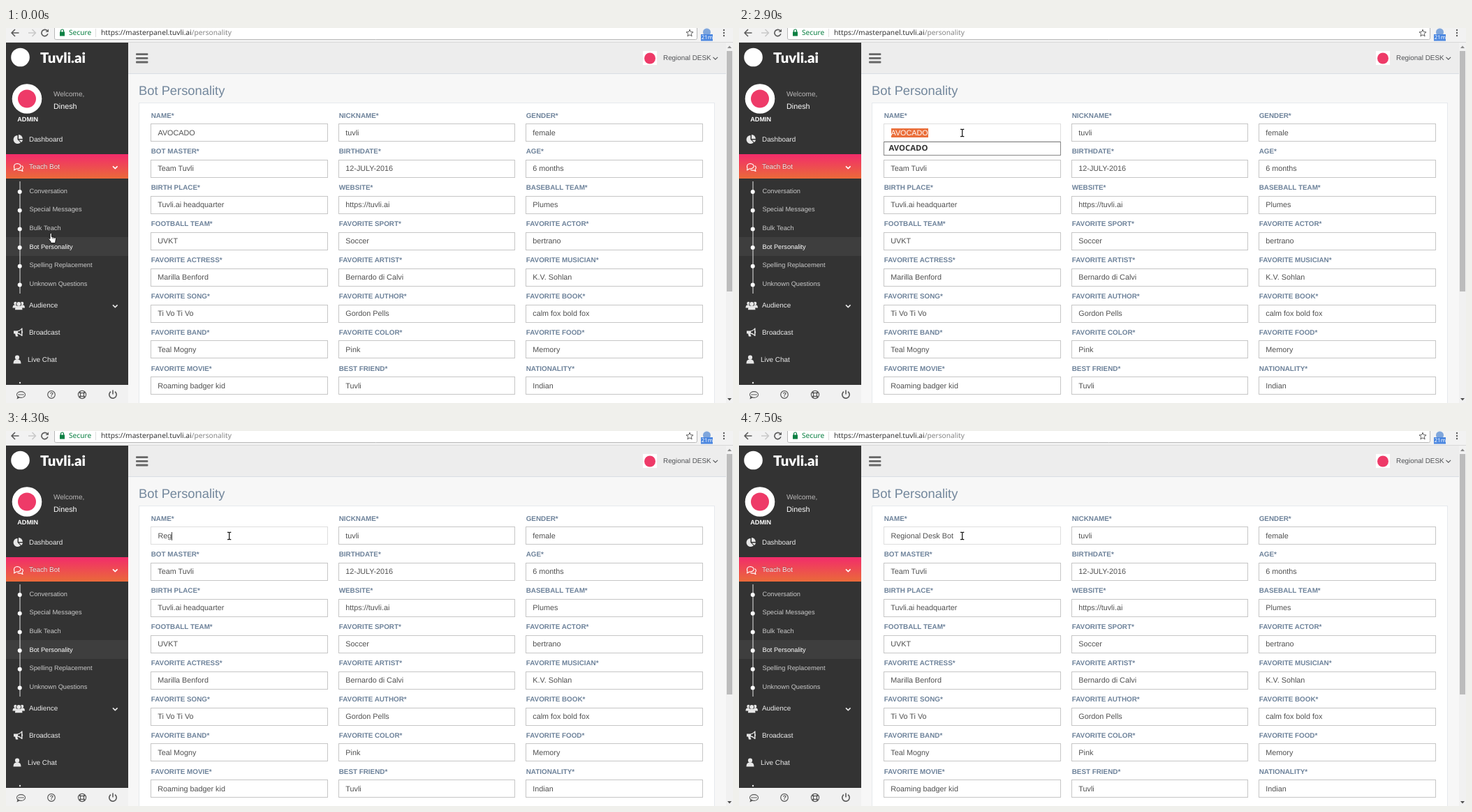
An HTML page with a canvas for the animation above (8 s loop, 1041 px wide and 538 px high).

```html
<!DOCTYPE html>
<html lang="en">
<head>
<meta charset="utf-8">
<title>Bot Personality</title>
<style>
html, body { margin: 0; width: 100%; height: 100%; overflow: hidden; background: #f7f7f7; }
#stage { position: absolute; left: 0; top: 0; width: 1041px; height: 538px; overflow: hidden;
  font-family: "Liberation Sans", Arial, sans-serif; text-rendering: geometricPrecision; }
canvas { position: absolute; left: 0; top: 0; }
span { position: absolute; line-height: 0; white-space: pre; }
.ui { font-family: "Noto Sans", "Open Sans", sans-serif; }
.logo { font-family: Lato, sans-serif; }
.active { text-shadow: 0 -1px 0 rgba(0, 0, 0, .25); }
#pick, #caret { position: absolute; left: 217.5px; top: 144px; height: 13px; }
#pick { background: #ea6f3b; }
#caret { width: 1px; top: 145px; height: 12px; background: #444; }
#popup { position: absolute; left: 207px; top: 163px; width: 252px; height: 18px;
  background: #fff; border: 1px solid #888; }
</style>
</head>
<body>
<div id="stage">
  <canvas id="base" width="1041" height="538"></canvas>
  <div id="pick"></div>
  <div id="labels"></div>
  <div id="caret"></div>
  <div id="popup"></div>
  <canvas id="mouse" width="1041" height="538"></canvas>
</div>
<script>
const $ = id => document.getElementById(id);
const g = $("base").getContext("2d");
const m = $("mouse").getContext("2d");
const OLD_NAME = "AVOCADO", NEW_NAME = "Regional Desk Bot";
const KEY_TIMES = [3900, 4100, 4300, 4600, 4800, 5000, 5100, 5200, 5300,
  5600, 5800, 5900, 6000, 6200, 6600, 6800, 6900];
const LOOP = 8000, LEFT = 217.5;

// y is the middle of the capitals
function label(text, x, y, size, color, opts = {}) {
  const s = document.createElement("span");
  s.textContent = text;
  s.className = opts.cls || "";
  s.style.cssText = `left:${x}px;top:${y}px;font-size:${size}px;color:${color};font-weight:${opts.weight || 400}`;
  (opts.parent || $("labels")).append(s);
  return s;
}
function rect(x, y, w, h, fill) {
  g.fillStyle = fill;
  g.fillRect(x, y, w, h);
}
function box(x, y, w, h, fill, line) {
  rect(x, y, w, h, line);
  rect(x + 1, y + 1, w - 2, h - 2, fill);
}
function disc(x, y, r, fill) {
  g.fillStyle = fill;
  g.beginPath();
  g.arc(x, y, r, 0, 7);
  g.fill();
}
function ring(x, y, r, color, width, from = 0, to = 2 * Math.PI) {
  g.strokeStyle = color;
  g.lineWidth = width;
  g.beginPath();
  g.arc(x, y, r, from, to);
  g.stroke();
}
function shape(d, fill) {
  g.fillStyle = fill;
  g.fill(new Path2D(d));
}
function line(d, color, width, c = g) {
  c.strokeStyle = color;
  c.lineWidth = width;
  c.lineJoin = "round";
  c.stroke(new Path2D(d));
}

function drawBrowser() {
  rect(0, 0, 1041, 21, "#f2f2f2");
  g.fillStyle = "#fff";
  g.strokeStyle = "#b8b8b8";
  g.lineWidth = 1;
  g.beginPath();
  g.roundRect(69.5, -6, 920, 22.5, 2);
  g.fill();
  g.stroke();
  rect(0, 20, 1041, 1, "#d8d8d8");
  line("M18.5 7H8M13 2L8 7L13 12", "#5c5c5c", 1.6);
  line("M32 7H42.5M37.5 2L42.5 7L37.5 12", "#c9c9c9", 1.6);
  ring(55.5, 7, 4.6, "#5c5c5c", 1.6, 0.3, 5.5);
  shape("M56.5 5.8H61V1.5Z", "#5c5c5c");
  rect(77, 5.5, 7, 6, "#0b8043");
  line("M78.5 6V4a2 2 0 0 1 4 0V6", "#0b8043", 1.2);
  label("Secure", 90, 6.3, 10.2, "#0b8043", { cls: "ui" });
  const url = label("https://masterpanel.tuvli.ai", 136, 6.3, 10.2, "#333", { cls: "ui" });
  label("/personality", 136 + url.getBoundingClientRect().width, 6.3, 10.2, "#858585", { cls: "ui" });
  rect(128, 1, 1, 12, "#ddd");
  let star = "";
  for (let i = 0; i < 10; i++) {
    const r = i % 2 ? 2.3 : 5.3, a = i * Math.PI / 5 - Math.PI / 2;
    star += (i ? "L" : "M") + (979 + r * Math.cos(a)) + " " + (7.5 + r * Math.sin(a));
  }
  line(star + "Z", "#5c5c5c", 1);
  disc(1003.5, 6, 5.5, "#7fa6dc");
  rect(995, 9, 17, 9.5, "#4a86e0");
  label("21m", 995.8, 13.7, 7.8, "#fff", { cls: "ui" });
  for (const y of [3, 7, 11]) disc(1028, y, 1.2, "#5c5c5c");
}

function chevron(x, y, color, width) {
  line(`M${x - 3.3} ${y - 1.6}L${x} ${y + 1.6}L${x + 3.3} ${y - 1.6}`, color, width);
}
function person(x, y, s, fill) {
  disc(x, y - 3 * s, 2.8 * s, fill);
  shape(`M${x - 5 * s} ${y + 5 * s}q0 ${-6 * s} ${5 * s} ${-5.4 * s}q${5 * s} ${-0.6 * s} ${5 * s} ${5.4 * s}Z`, fill);
}

function drawSidebar() {
  rect(0, 21, 175, 491, "#333");
  disc(20.5, 42, 13.3, "#fff");
  label("Tuvli.ai", 49, 43, 20.4, "#fff", { cls: "logo", weight: 900 });
  disc(30, 101.5, 21.3, "#fff");
  disc(30, 101.5, 13, "#ee3a68");
  label("ADMIN", 16.3, 130.5, 9.1, "#fff", { weight: 700 });
  label("Welcome,", 68, 95.5, 10, "#bab8b8");
  label("Dinesh", 68, 112.5, 10.8, "#fff");

  const grad = g.createLinearGradient(0, 181, 0, 216);
  grad.addColorStop(0, "#f22c6b");
  grad.addColorStop(1, "#ea6a39");
  rect(0, 181, 175, 35, grad);
  rect(0, 300, 175, 27, "#3e3e3e");

  const menu = [["Dashboard", 33, 160.5], ["Teach Bot", 33, 199.5, "active"], ["Audience", 33, 399],
    ["Broadcast", 33, 438], ["Live Chat", 31, 477]];
  for (const [text, x, y, cls] of menu) label(text, x, y, 9.9, "#ececec", { cls });
  chevron(156.3, 200, "#fff", 1.6);
  chevron(156.3, 399, "#e7e7e7", 1.6);

  rect(19.5, 220, 1, 161, "#e4e4e4");
  ["Conversation", "Special Messages", "Bulk Teach", "Bot Personality",
    "Spelling Replacement", "Unknown Questions"].forEach((text, i) => {
    const y = 233.5 + i * 26.7;
    disc(19.7, y + 1.5, 3, "#fff");
    label(text, 33.5, y, 9.25, i === 3 ? "#fff" : "#c9c9c9");
  });

  const c = "#e7e7e7";
  shape("M16.5 160V154A6 6 0 1 0 20.8 164.3Z", c);
  shape("M18 159V153A6 6 0 0 1 23.8 159Z", c);
  shape("M18.5 160.5H24A6 6 0 0 1 22 164Z", c);
  line("M12 201.5Q10 195 16 194.5Q21.5 195 21 199Q20 202 15 202L11.5 204Z", "#fff", 1.1);
  line("M22.5 197.5Q26 200 23 203L24 205.5L20.5 204Q18 204.5 16.5 203.5", "#fff", 1.1);
  person(13.5, 397.5, 0.8, c);
  person(23, 397.5, 0.8, c);
  disc(18.2, 396, 3.8, "#333");
  person(18.2, 399, 1.05, c);
  shape("M11 434.5H16Q20 434 22.5 430.5H23.5V435Q25 436 23.5 437.5V442H22.5Q20 439 16 438.5L17.5 442.5H14L13 438.5H11Z", c);
  shape("M17 435.5Q20 435 22 432.8V440Q20 437.5 17 437.2Z", "#333");
  person(16, 476, 1.1, c);
  disc(20, 509, 1.2, c);

  rect(0, 512, 175, 26, "#f1f1f1");
  const k = "#5a5a5a";
  g.strokeStyle = k;
  g.lineWidth = 1.1;
  g.beginPath();
  g.ellipse(21.5, 526, 6, 4.4, 0, 0, 7);
  g.stroke();
  shape("M16.5 528L15.5 532.5L20.5 530Z", k);
  for (const x of [18.7, 21.5, 24.3]) disc(x, 526, 0.9, k);
  ring(65, 526, 5.3, k, 1.2);
  label("?", 62.4, 526.2, 9, k, { weight: 700 });
  ring(109, 526, 5.6, k, 1.2);
  ring(109, 526, 2.6, k, 1.1);
  for (let i = 0; i < 4; i++) {
    const a = Math.PI / 4 + i * Math.PI / 2;
    ring(109, 526, 4.1, k, 2.6, a - 0.28, a + 0.28);
  }
  ring(153, 526, 5.2, k, 1.6, -0.95, Math.PI + 0.95);
  rect(152.2, 519.5, 1.6, 6, k);
}

const ROWS = [
  ["NAME", "", "NICKNAME", "tuvli", "GENDER", "female"],
  ["BOT MASTER", "Team Tuvli", "BIRTHDATE", "12-JULY-2016", "AGE", "6 months"],
  ["BIRTH PLACE", "Tuvli.ai headquarter", "WEBSITE", "https://tuvli.ai", "BASEBALL TEAM", "Plumes"],
  ["FOOTBALL TEAM", "UVKT", "FAVORITE SPORT", "Soccer", "FAVORITE ACTOR", "bertrano"],
  ["FAVORITE ACTRESS", "Marilla Benford", "FAVORITE ARTIST", "Bernardo di Calvi", "FAVORITE MUSICIAN", "K.V. Sohlan"],
  ["FAVORITE SONG", "Ti Vo Ti Vo", "FAVORITE AUTHOR", "Gordon Pells", "FAVORITE BOOK", "calm fox bold fox"],
  ["FAVORITE BAND", "Teal Mogny", "FAVORITE COLOR", "Pink", "FAVORITE FOOD", "Memory"],
  ["FAVORITE MOVIE", "Roaming badger kid", "BEST FRIEND", "Tuvli", "NATIONALITY", "Indian"]
];
const COLS = [[207, 254], [476, 253], [744, 254]];

function drawPage() {
  rect(175, 21, 856, 517, "#f7f7f7");
  rect(175, 21, 856, 44, "#ededed");
  rect(175, 65, 856, 1, "#d9dee4");
  g.fillStyle = "#666";
  for (const y of [36.2, 41.9, 47.6]) {
    g.beginPath();
    g.roundRect(186, y, 17.4, 2.8, 1);
    g.fill();
  }
  rect(912, 33, 20, 20, "#fff");
  disc(922, 43.5, 8, "#ee3a68");
  label("Regional DESK", 941, 43.5, 9.9, "#515356");
  chevron(1015.8, 43.5, "#515356", 1.1);
  label("Bot Personality", 190, 90, 18.35, "#73879c");
  box(190, 107, 825, 440, "#fff", "#e6e9ed");
  ROWS.forEach((row, r) => COLS.forEach(([x, w], c) => {
    const y = r * 51.9;
    label(row[c * 2] + "*", x + 0.7, 126.5 + y, 9.87, "#6d829a", { weight: 700 });
    box(x, Math.round(137 + y), w, 26, "#fff", "#c6c6c6");
    label(row[c * 2 + 1], x + 10.3, 150.5 + y, 10.8, "#505050");
  }));
  rect(1031, 21, 10, 517, "#f1f1f1");
  rect(1032, 33, 8, 345, "#bcbcbc");
  shape("M1033 29L1036 25.5L1039 29Z", "#8a8a8a");
  shape("M1033 531L1036 534.5L1039 531Z", "#505050");
}

drawPage();
drawSidebar();
drawBrowser();
const nameText = label("", LEFT, 150.5, 10.8, "#505050");
label(OLD_NAME, 6.5, 9.3, 11.3, "#333", { cls: "ui", weight: 700, parent: $("popup") });

function drawHand(x, y) {
  const d = `M${x + 3} ${y + 8}V${y + 1.5}q1.2 -1.8 2.4 0V${y + 6}l5 1.2q1.4 .5 1.2 2.2l-.8 3.4V${y + 15}H${x + 4}V${y + 13}L${x + 0.7} ${y + 9.2}q-.4 -2 2.3 -.2Z`;
  m.fillStyle = "#fff";
  m.fill(new Path2D(d));
  line(d, "#111", 1, m);
  line(`M${x + 6.8} ${y + 6.5}v2.6M${x + 9} ${y + 7}v2.4`, "#111", 0.7, m);
}
function drawArrow(x, y) {
  const d = `M${x} ${y}V${y + 12}L${x + 2.8} ${y + 9.4}L${x + 4.8} ${y + 14}L${x + 6.8} ${y + 13}L${x + 4.9} ${y + 8.7}H${x + 8.7}Z`;
  m.fillStyle = "#fff";
  m.fill(new Path2D(d));
  line(d, "#111", 1.2, m);
}
function drawBeam(x, y) {
  const end = s => `M${x - 2.6} ${y + 5.2 * s}H${x - 1}L${x} ${y + 4.5 * s}L${x + 1} ${y + 5.2 * s}H${x + 2.6}`;
  const d = `${end(-1)}M${x} ${y - 4.5}V${y + 4.5}${end(1)}`;
  line(d, "#fff", 2.6, m);
  line(d, "#111", 1.2, m);
}
function drawMouse(t) {
  m.clearRect(0, 0, 1041, 538);
  if (t < 1400) return drawHand(60, 293.5);
  const p = Math.min(1, Math.max(0, (t - 1600) / 500));
  const e = p * p * (3 - 2 * p);
  const x = 316.7 + 3 * e, y = 173.5 - 23 * e;
  if (y < 163) drawBeam(x, y);
  else drawArrow(x, y);
}

function render(time) {
  const t = Math.floor(time / 100) * 100;
  const typed = KEY_TIMES.filter(k => k <= t).length;
  const empty = t >= 3300 && !typed;
  const selected = t >= 2400 && t < 3300;

  nameText.textContent = t < 3300 ? OLD_NAME : empty ? "NAME" : NEW_NAME.slice(0, typed);
  nameText.style.color = selected ? "#fff" : empty ? "#9c9c9c" : "#505050";
  const width = nameText.getBoundingClientRect().width;
  $("pick").style.width = (selected ? width : 0) + "px";

  const caretOn = t >= 2200 && !selected && t !== 3800 && t < 7500;
  $("caret").style.display = caretOn ? "block" : "none";
  $("caret").style.left = Math.round(LEFT + (empty ? 0 : width) - 0.5) + "px";

  $("popup").style.opacity = t < 2900 || t >= 3500 ? 0 : t < 3400 ? 1 : 0.5;
  box(207, 137, 254, 26, "#fff", t < 2200 ? "#c6c6c6" : t < 2300 ? "#d2d2d2" : "#dedede");
  drawMouse(t);
}

const start = performance.now();
function tick() {
  render((performance.now() - start) % LOOP);
  requestAnimationFrame(tick);
}
tick();
</script>
</body>
</html>
```
